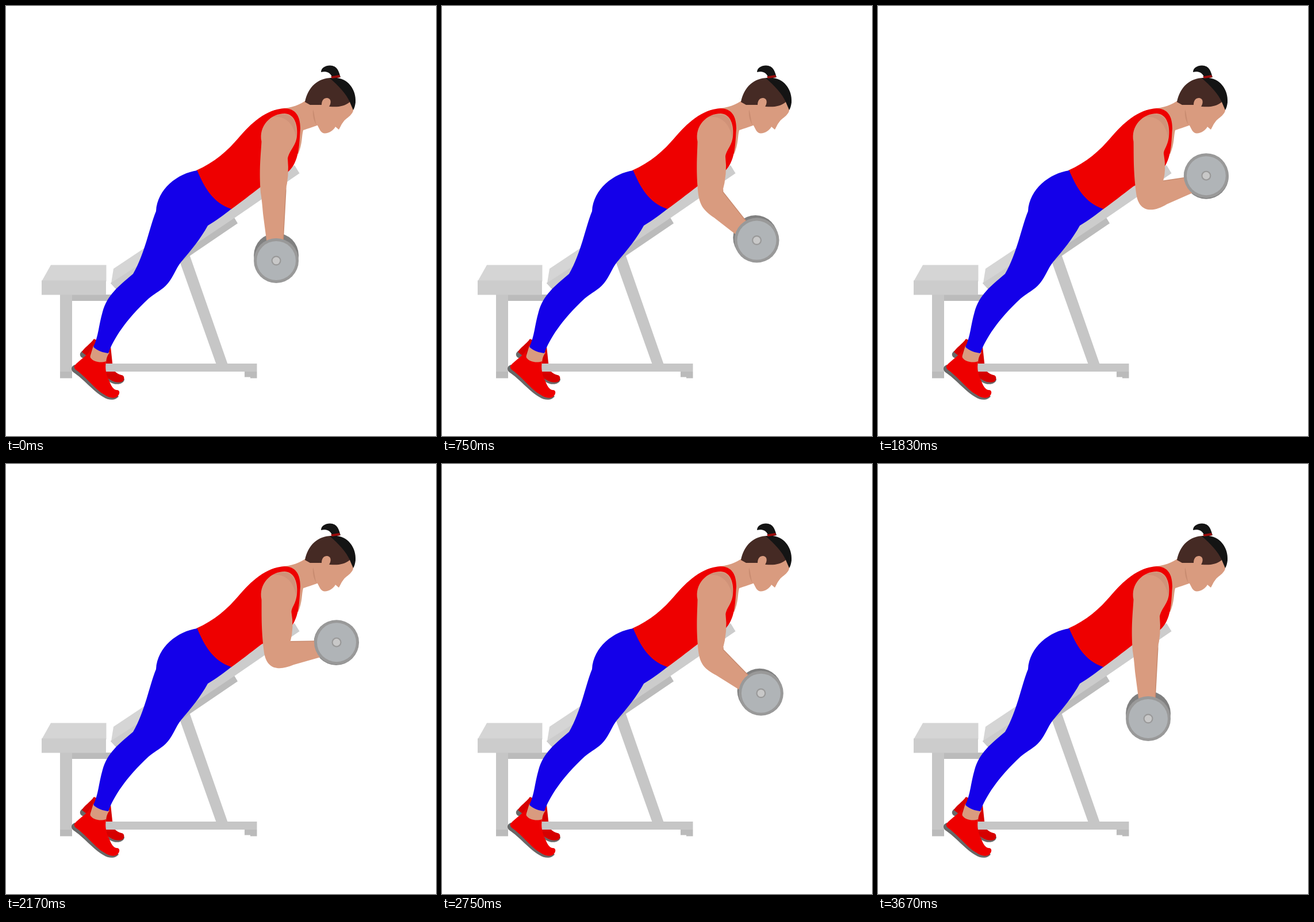
An HTML page with a canvas for the animation above (3790 ms loop, 748 by 748 pixels).

```html
<!DOCTYPE html>
<html lang="en">
<head>
<meta charset="utf-8">
<title>Incline dumbbell curl</title>
<style>
html, body { margin: 0; width: 100%; height: 100%; overflow: hidden; background: #fff; }
canvas { display: block; width: 100vw; height: 100vh; }
</style>
</head>
<body>
<canvas id="stage" width="748" height="748"></canvas>
<script>
const ctx = document.getElementById('stage').getContext('2d');
const LOOP = 3790, STEP = 1000 / 24;
const SKIN = '#d99b7f', SHADE = '#c98c71', SOFT_SHADE = '#d09278';
const RED = '#ee0000', FAR_RED = '#d60000', BLUE = '#1400e9';
const PAD_TOP = '#d5d5d5', PAD = '#cccccc', STEEL = '#c6c6c6', DARK_STEEL = '#bbbbbb';
const SOLE = '#686868', BLACK = '#141414';
const REST = 2, PEAK = 109.4;
const PIVOT = { x: 466.2, y: 332 }, REACH = 111;

// Forearm swing: time in ms, angle from straight down in degrees, speed in degrees per ms.
const SWING = [
  [125, REST, 0], [750, 47.1, 0.11], [1250, 98.8, 0.055], [1750, PEAK, 0],
  [1860, PEAK, 0], [2460, 81.2, -0.085], [3080, 22.3, -0.075], [3667, REST, 0]
];

function swingAngle(t) {
  const i = SWING.findIndex(key => key[0] > t);
  if (i < 1) return REST;
  const [t0, a0, s0] = SWING[i - 1], [t1, a1, s1] = SWING[i];
  const d = t1 - t0, u = (t - t0) / d, v = 1 - u;
  return a0 * v * v * (1 + 2 * u) + a1 * u * u * (3 - 2 * u)
    + d * u * v * (s0 * v - s1 * u);
}

const shape = (color, path) => ({ color, path: new Path2D(path) });

const farShoe = [
  shape(SOLE, 'M137 598C128 601 127 607 131 611L150 622L172 646C180 655 188 660 199 657C204 655 206 652 206 649Z'),
  shape(FAR_RED, 'M153 579C147 588 136 594 132 602L150 616L172 642C181 654 196 657 203 653C207 649 206 643 201 642C194 640 188 636 186 630L182 592Z')
];

const bench = [
  shape(DARK_STEEL, 'M114 502H184V513H114Z'),
  shape(STEEL, 'M94 502H115V637H94Z'),
  shape(DARK_STEEL, 'M94 636H115V647.5H94Z'),
  shape(STEEL, 'M302 444L319 432L386 624H366Z'),
  shape(STEEL, 'M173 622H436.5V636H173Z'),
  shape(DARK_STEEL, 'M415 636H436.5V647.5H425V645.5H415Z'),
  shape(PAD_TOP, 'M78 450.5H174.5V479H62Z'),
  shape(PAD, 'M62 477.5H174V502.5H62Z'),
  shape(DARK_STEEL, 'M182 482L193 494L240 462V450ZM397 368L403 378L300 448V430Z'),
  shape(PAD_TOP, 'M187 457L250 415V440L183 482Z'),
  shape(PAD, 'M182 482L502 277L510.500 291L397 369L300 434L190 491Z')
];

const body = [
  // ankle and near shoe
  shape(SKIN, 'M152 591L180 603C176 608 174 614 174 623L144 617Z'),
  shape(SOLE, 'M120 624C112 627 113 633 117 637C134 648 154 672 169 680C181 688 192 685 196 679L188 674Z'),
  shape(RED, 'M148 597C142 608 126 617 119 626C118 629 120 632 123 634C140 646 156 668 171 676C180 683 190 683 194 679C199 674 198 668 193 668C187 668 183 661 180 653C174 642 172 631 174 618C166 621 153 620 147 612C145 606 147 601 148 597Z'),
  // neck
  shape(SKIN, 'M476 179C497 177 512 172 523 163L545 170L543 207C533 211 523 214 517 216C514 227 516 239 508 258L490 230Z'),
  // top
  shape(RED, 'M331 286C363 272 386 251 404 230C426 204 452 180 484 178C504 178 512 192 512 213C511 224 511 244 507 259C503 275 497 283 489 290L444 314C424 329 408 342 391 354C360 355 330 310 331 286Z'),
  // tights
  shape(BLUE, 'M332.500 286C299 291 263 318 261 357C249 386 242 430 221 466C195 488 176 503 168 532C161 556 161 574 152 593C159 600 169 603 178 604C187 579 209 545 248 509C261 498 271 495 282 482C291 471 296 456 304 446C322 425 339 404 351 382C366 373 381 362 392 353C359 342 345 315 332.500 286Z'),
  // ponytail, head, hair
  shape(BLACK, 'M548 115C548 107 557 103 564 103.500C576 104 579 113 582 124L568 126C566 118 560 112 548 115Z'),
  shape(SKIN, 'M521 166C535 140 565 130 590 150L604 178C606 188 592 195 588 200C583 206 582 210 579 215L573 210C570 216 561 222 554 221.500C547 221 545 213 541 206L533 195Z'),
  shape(SHADE, 'M534 180C533 190 535 199 540 207C537 198 537 188 534 180Z'),
  shape('#452a24', 'M520 167C525 141 543 125 566 125C582 129 596 149 598 167C588 175 578 176 563 175L552 172H529Z'),
  shape(BLACK, 'M563 125.500C590 120 610 142 608 168C607 174 606 178 604 181L598 167C592 153 578 138 563 125.500Z'),
  shape('#9b0b0b', 'M565 122.500L580 120L581.500 124L567 126Z'),
  shape(SKIN, 'M550 178C547 168 551 159 559 160C566 161 566 169 562 175Z')
];

const shoulderShade = shape(SOFT_SHADE, 'M464 193C482 184 498 189 502 202C505 212 506 222 505 231C502 210 490 190 464 193Z');

function fill({ color, path }) {
  ctx.fillStyle = color;
  ctx.fill(path);
}

function disc(x, y, r, color) {
  ctx.fillStyle = color;
  ctx.beginPath();
  ctx.arc(x, y, r, 0, Math.PI * 2);
  ctx.fill();
}

function drawArm(angle) {
  const a = angle * Math.PI / 180, k = (angle - REST) / (PEAK - REST);
  const sin = Math.sin(a), cos = Math.cos(a);
  // Point on the forearm: distance along it, offset towards the front.
  const at = (along, front) => [
    PIVOT.x + along * sin + front * cos,
    PIVOT.y + along * cos - front * sin
  ];
  const crook = [486 + 10 * k * k, 322 + 8 * k - 25 * k ** 3];
  const wristFront = at(82, 12 - 5 * k), wristBack = at(82, -15 - 5 * k);
  const [x, y] = at(REACH, 0);

  disc(x - 9 * k * (1 - k), y - 9 + 10.5 * k, 39, '#808080');

  ctx.strokeStyle = SHADE;
  ctx.lineWidth = 3;
  ctx.beginPath();
  ctx.moveTo(crook[0], crook[1] - 8 * (1 - k));
  ctx.lineTo(...crook);
  ctx.lineTo(...wristFront);
  ctx.stroke();

  ctx.fillStyle = SKIN;
  ctx.beginPath();
  ctx.moveTo(444.5, 236);
  ctx.bezierCurveTo(439, 208, 461, 187, 485, 187);
  ctx.bezierCurveTo(503, 188, 508, 209, 506, 227);
  ctx.bezierCurveTo(504, 244, 494 + 3 * k, 249, 490 + 7 * k, 265 - 8 * k);
  ctx.quadraticCurveTo(493 + 9 * k, 296 - 12 * k, ...crook);
  ctx.lineTo(...wristFront);
  ctx.lineTo(...wristBack);
  ctx.lineTo(...at(30, -20 - 4 * k));
  ctx.bezierCurveTo(...at(12 - 10 * k, -21 - 9 * k), 445 + 8 * k, 338 + 22 * k, 443 + 6 * k, 325);
  ctx.bezierCurveTo(440 + 4 * k, 285, 443 + 2 * k, 262, 444.5, 236);
  ctx.fill();
  fill(shoulderShade);

  disc(x, y, 39, '#999999');
  disc(x, y, 34, '#b0b4b7');
  disc(x, y, 8.5, '#999999');
  disc(x, y, 6.3, '#c8c8c8');
}

function draw(now) {
  const time = Math.floor((now % LOOP + 4) / STEP) * STEP;
  ctx.fillStyle = '#fff';
  ctx.fillRect(0, 0, 748, 748);
  [...farShoe, ...bench, ...body].forEach(fill);
  drawArm(swingAngle(time));
}

let start;
function tick(now) {
  start ??= now;
  draw(now - start);
  requestAnimationFrame(tick);
}
draw(0);
requestAnimationFrame(tick);
</script>
</body>
</html>
```
